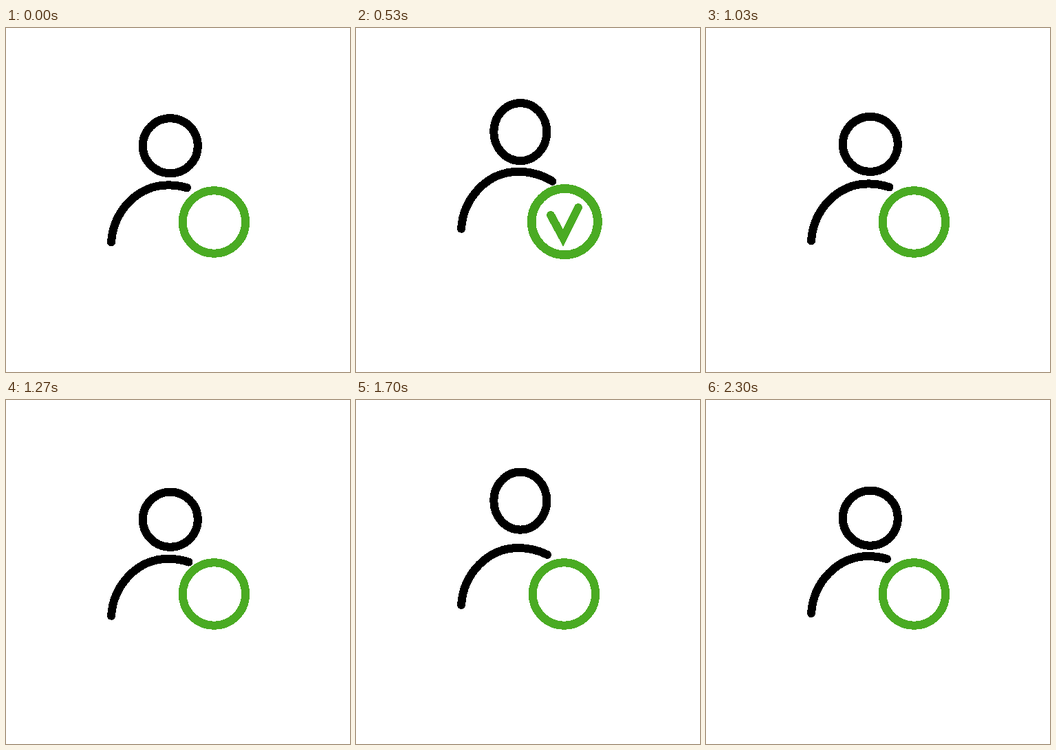
An HTML page that plays this animation: 500 px wide and 500 px high, repeating every 2330 ms.

```html
<!DOCTYPE html>
<html lang="en">
<head>
<meta charset="utf-8">
<title>User approved</title>
<style>
  html, body { margin: 0; width: 100%; height: 100%; overflow: hidden; background: #fff; }
  svg { display: block; width: 100%; height: 100%; fill: none; stroke-width: 12; stroke-linecap: round; shape-rendering: crispEdges; }
</style>
</head>
<body>
<svg viewBox="0 0 500 500">
  <g stroke="#000">
    <path id="body"/>
    <ellipse id="head" cx="238.8"/>
  </g>
  <g stroke="#4aab23">
    <circle id="ring"/>
    <path id="check" d="M283 272L301 305L323 261" pathLength="1"/>
  </g>
</svg>
<script>
// Times are in steps; the picture advances 30 times a second.
const LOOP = 2330, STEPS = 70;
const GRAVITY = 0.9, FALL_TIME = 5.6;
const hops = [
  { apex: 19, top: 143, pace: 1 },
  { apex: 48.5, top: 141, pace: 0.75 }
];

function ease(t, from, to) {
  const u = Math.min(1, Math.max(0, (t - from) / (to - from)));
  return u * u * (3 - 2 * u);
}

// Eases from 0 to 1 over a..b and back to 0 over c..d.
const hold = (t, a, b, c, d) => ease(t, a, b) - ease(t, c, d);

const spring = t => t < 0 ? 0 : Math.exp(-0.15 * t) * Math.sin(2 * Math.PI * t / 11.5);

function pose(t) {
  let crouch = 0, rise = 0, reach = 0, stretch = 0, bounce = 0, flight = Infinity;
  for (const { apex, top, pace } of hops) {
    const u = (t - apex) / pace;
    crouch += hold(u, -21, -16, -15, -9);
    rise += hold(u, -15, -5, -1, 10);
    reach += hold(u, -16, -6, -7, 18);
    stretch += hold(u, -9, -6, 4, 8);
    bounce += spring(t - apex - FALL_TIME);
    flight = Math.min(flight, top + GRAVITY * (t - apex) ** 2);
  }
  const shoulder = 226.8 + 4.5 * crouch - 18 * rise + 3 * bounce;
  const rest = 170.5 + 2 * crouch + 12 * bounce;
  const carried = shoulder - 49.5 - 2 * stretch;
  return { shoulder, stretch, armX: 263 + 24 * reach, headY: Math.min(rest, carried, flight) };
}

function set(id, attrs) {
  const el = document.getElementById(id);
  for (const name in attrs) el.setAttribute(name, attrs[name]);
}

function draw(now) {
  const t = Math.min(STEPS - 1, Math.floor((now % LOOP + 4) * STEPS / LOOP));
  const { shoulder: y, stretch, armX, headY } = pose(t);

  set('head', { cy: headY, rx: 40 - 1.5 * stretch, ry: 40 + 2 * stretch });

  const armY = y + 83 * (1 - Math.sqrt(1 - ((armX - 236) / 89) ** 2));
  set('body', { d: `M153 ${y + 83}C156 ${y + 38} 191 ${y} 236 ${y}A89 83 0 0 1 ${armX} ${armY}` });

  const pulse = hold(t, 0, 10, 18, 30);
  set('ring', {
    cx: 302.5 + 0.8 * pulse, cy: 282 - 0.4 * pulse,
    r: 45.7 + 2.4 * pulse, 'stroke-width': 12 + 0.7 * pulse
  });

  const from = ease(t, 17, 27), length = ease(t, 2, 10) - from;
  set('check', {
    'stroke-dasharray': `${length} 2`,
    'stroke-dashoffset': -from,
    visibility: length > 0.001 ? 'visible' : 'hidden'
  });

  requestAnimationFrame(draw);
}
requestAnimationFrame(draw);
</script>
</body>
</html>
```
